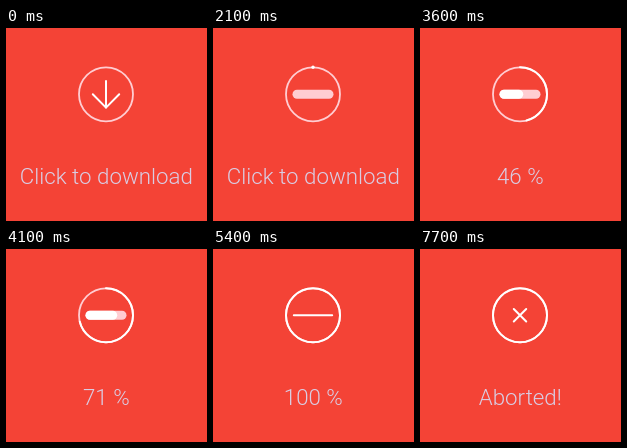
Recreate the animation shown at these times as an HTML page. Size 201 px wide and 193 px high, loop 8000 ms.

```html
<!DOCTYPE html>
<html lang="en">
<head>
<meta charset="utf-8">
<title>Download button</title>
<style>
  html, body { margin: 0; width: 100%; height: 100%; overflow: hidden; background: #f44336; }
  svg { display: block; width: 100vw; height: 100vh; }
  text { font: 300 22.3px Roboto, sans-serif; fill: #d9cde3; text-anchor: middle; }
  .line { fill: none; stroke: #fff; stroke-width: 2; stroke-linecap: round; stroke-linejoin: round; }
</style>
</head>
<body>
<svg viewBox="0 0 201 193">
  <rect width="201" height="193" fill="#f44336"/>
  <circle cx="100" cy="66.3" r="27" fill="none" stroke="#ffcdd2" stroke-width="1.8"/>
  <path id="ring" class="line" stroke-linecap="butt" pathLength="100"
        d="M100 39.3a27 27 0 0 1 0 54a27 27 0 0 1 0-54"/>
  <path id="shaft" class="line"/>
  <circle id="dot" cx="100" r="1.7" fill="#fff"/>
  <path id="shape" class="line"/>
  <path id="fill" class="line"/>
  <text id="label" x="100.3" y="156"></text>
</svg>
<script>
const LOOP = 8000, CX = 100, CY = 66.3, TOP = 39.3, HALF = 16;
const [ring, shaft, dot, shape, fill, label] =
  ['ring', 'shaft', 'dot', 'shape', 'fill', 'label'].map(id => document.getElementById(id));

const clamp = v => Math.min(1, Math.max(0, v));
const span = (t, from, to) => clamp((t - from) / (to - from));
const mix = (a, b, k) => a + (b - a) * k;
const smooth = k => k * k * (3 - 2 * k);
const backOut = k => 1 + 2.7 * (k - 1) ** 3 + 1.7 * (k - 1) ** 2;
const set = (el, attrs) => { for (const k in attrs) el.setAttribute(k, attrs[k]); };
const show = (el, on) => { el.style.display = on ? '' : 'none'; };

function crossPath(k) {
  const a = k * Math.PI / 4, r = mix(19.2, 8.8, k);
  const x = r * Math.cos(a), y = r * Math.sin(a);
  return `M${CX - x} ${CY - y}L${CX + x} ${CY + y}M${CX - x} ${CY + y}L${CX + x} ${CY - y}`;
}

function arrowPath(k) {
  const w = mix(13.2, 19.2, k), tip = mix(13.3, 0, k);
  return `M${CX - w} ${CY}L${CX} ${CY + tip}L${CX + w} ${CY}`;
}

function drawArrow(t) {
  const shrink = smooth(span(t, 450, 900));
  const len = mix(13.3, 0, shrink);
  show(shaft, shrink < 1);
  shaft.setAttribute('d', `M${CX} ${CY - len}V${CY + len}`);

  const jump = backOut(span(t, 1300, 1750));
  show(dot, t >= 850 && t < 2700);
  dot.setAttribute('cy', mix(CY, TOP, jump));

  shape.setAttribute('d', arrowPath(smooth(span(t, 860, 1300))));
}

function drawBar(t, done) {
  const grow = smooth(span(t, 1650, 2000)), thin = smooth(span(t, 4750, 5300));
  const width = mix(2, 9, grow * (1 - thin));
  const reach = mix(19.2, HALF, (width - 2) / 7);
  if (t >= 1650) shape.setAttribute('d', `M${CX - reach} ${CY}H${CX + reach}`);
  const tint = Math.round(mix(255, 205, done < 1 ? grow : 0));
  set(shape, { style: `stroke-width:${width};stroke:rgb(255,${tint},${Math.min(255, tint + 5)})` });

  const end = CX - HALF + 2 * HALF * done;
  show(fill, done > 0 && done < 1);
  set(fill, { d: `M${CX - HALF} ${CY}H${end}`, style: fill.style.display ? 'display:none' : 'stroke-width:9' });
}

function caption(t, done) {
  if (t < 2200) return 'Click to download';
  return t < 5600 ? Math.round(done * 100) + ' %' : 'Aborted!';
}

function draw(t) {
  const done = span(t, 2680, 4680);
  drawArrow(t);
  drawBar(t, done);
  if (t >= 5550) shape.setAttribute('d', crossPath(backOut(span(t, 5550, 6200))));
  show(ring, done > 0);
  ring.setAttribute('stroke-dasharray', done < 1 ? `${done * 100} 200` : 'none');
  label.textContent = caption(t, done);
}

const start = performance.now();
function tick() {
  draw((performance.now() - start) % LOOP);
  requestAnimationFrame(tick);
}
tick();
</script>
</body>
</html>
```
